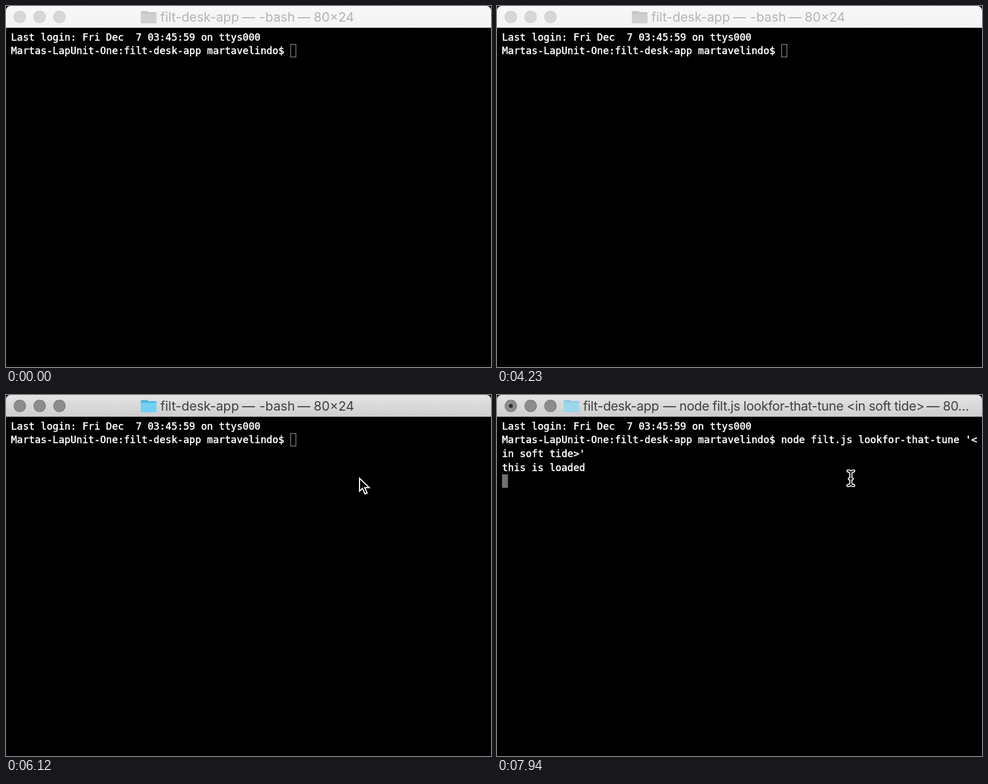
Write an HTML page with a canvas that moves like this. It is 867x646 px and loops after 8000 ms.

```html
<!DOCTYPE html>
<html lang="en">
<head>
<meta charset="utf-8">
<title>Terminal</title>
<style>
html, body { margin: 0; width: 100%; height: 100%; overflow: hidden; background: #000; }
canvas { display: block; }
</style>
</head>
<body>
<canvas id="stage" width="867" height="646"></canvas>
<script>
const ctx = document.getElementById('stage').getContext('2d');
const W = 867, H = 646, LOOP = 8000;
const BAR = 39;
const CELL = { x: 9, y: 43.3, w: 10.617, h: 24.6 };

// Moments in ms at which the state of the window changes.
const AT = { pointer: 5680, focus: 6090, block: 6140, beam: 6200, recall: 7460, run: 7730, loaded: 7900 };

const PROMPT = 'Martas-LapUnit-One:filt-desk-app martavelindo$ ';
const COMMAND = "node filt.js lookfor-that-tune '<in soft tide>'";

// Pointer tip: time, x, y.
const PATH = [[5680, 699, 650], [5780, 697, 408], [5810, 691, 338], [5870, 674, 254],
  [5950, 648, 184], [6030, 634, 152], [6080, 631, 147]];

function pointerAt(t) {
  const last = PATH[PATH.length - 1];
  if (t >= last[0]) return [last[1], last[2]];
  const i = PATH.findIndex(p => p[0] > t);
  const [t0, x0, y0] = PATH[i - 1], [t1, x1, y1] = PATH[i];
  const k = (t - t0) / (t1 - t0);
  return [x0 + (x1 - x0) * k, y0 + (y1 - y0) * k];
}

function disc(x, y, r, fill) {
  ctx.beginPath();
  ctx.arc(x, y, r, 0, Math.PI * 2);
  ctx.fillStyle = fill;
  ctx.fill();
}

function box(x, y, w, h, r, fill) {
  ctx.beginPath();
  ctx.roundRect(x, y, w, h, r);
  ctx.fillStyle = fill;
  ctx.fill();
}

function folder(x, back, front) {
  box(x, 9, 13, 8, 2, back);
  box(x, 11, 28, 20, 2, back);
  box(x, 14, 28, 17, [1, 1, 2, 2], front);
}

function titleBar(active, running) {
  const shade = ctx.createLinearGradient(0, 0, 0, BAR);
  shade.addColorStop(0, active ? '#e4e4e4' : '#f8f8f8');
  shade.addColorStop(1, active ? '#cecece' : '#f3f3f3');
  box(0, 0, W, BAR, [8, 8, 0, 0], shade);
  ctx.fillStyle = active ? '#b0b0b0' : '#dadada';
  ctx.fillRect(0, BAR - 1, W, 1);

  for (let i = 0; i < 3; i++) {
    const x = 24.7 + i * 35.4;
    disc(x, 19.5, 11, active ? '#777' : '#cbcbcb');
    disc(x, 19.5, 10, active ? '#8c8c8c' : '#d7d7d7');
  }
  if (running) disc(24.7, 19.5, 3.6, '#2c2c2c');

  if (running) folder(119, '#90cde6', '#a0d6ec');
  else if (active) folder(241, '#50b8e4', '#72d0f6');
  else folder(241, '#c6c6c6', '#d0d0d0');

  ctx.font = '23px Inter, Roboto, sans-serif';
  ctx.letterSpacing = running ? '-0.4px' : '0px';
  ctx.fillStyle = active ? '#404040' : '#b4b4b4';
  const parts = running
    ? [['filt-desk-app', 154], ['—', 297], [COMMAND.replaceAll("'", ''), 326], ['—', 768], ['80…', 797]]
    : [['filt-desk-app', 276], ['—', 422], ['-bash', 453], ['—', 521], ['80×24', 550]];
  for (const [text, x] of parts) ctx.fillText(text, x, 28);
  ctx.letterSpacing = '0px';
}

// Writes on the 80-column grid and returns the cell after the last character.
function write(text, row, col = 0) {
  ctx.font = '17.64px "DejaVu Sans Mono", monospace';
  ctx.fillStyle = ctx.strokeStyle = '#fff';
  ctx.lineWidth = 0.55;
  ctx.lineJoin = 'round';
  for (const ch of text) {
    if (col === 80) { col = 0; row++; }
    const x = CELL.x + col * CELL.w, y = CELL.y + row * CELL.h + 18.5;
    ctx.fillText(ch, x, y);
    ctx.strokeText(ch, x, y);
    col++;
  }
  return { row, col };
}

function caret({ row, col }, solid) {
  const x = Math.round(CELL.x + col * CELL.w), y = Math.round(CELL.y + row * CELL.h);
  if (solid) {
    ctx.fillStyle = '#707070';
    ctx.fillRect(x, y, 10.6, 24);
  } else {
    ctx.strokeStyle = '#777';
    ctx.lineWidth = 1.5;
    ctx.lineJoin = 'miter';
    ctx.strokeRect(x + 0.75, y + 0.75, 9.5, 22.5);
  }
}

function arrow(x, y) {
  const points = [[1, 2], [1, 25], [6.3, 20], [10.8, 30.2], [14.6, 28.5], [10.4, 18.8], [18.3, 18.8]];
  ctx.beginPath();
  for (const [dx, dy] of points) ctx.lineTo(x + dx, y + dy);
  ctx.closePath();
  ctx.fillStyle = '#000';
  ctx.fill();
  ctx.strokeStyle = '#fff';
  ctx.lineWidth = 2;
  ctx.lineJoin = 'miter';
  ctx.stroke();
}

function beam(x, y) {
  ctx.beginPath();
  for (const side of [-1, 1]) {
    ctx.moveTo(x + side * 5, y - 13);
    ctx.quadraticCurveTo(x, y - 13, x, y - 8.5);
    ctx.lineTo(x, y + 8.5);
    ctx.quadraticCurveTo(x, y + 13, x + side * 5, y + 13);
  }
  ctx.moveTo(x - 2.5, y + 1);
  ctx.lineTo(x + 2.5, y + 1);
  ctx.lineCap = 'round';
  ctx.lineJoin = 'round';
  for (const [color, width] of [['#fff', 5.6], ['#000', 2]]) {
    ctx.strokeStyle = color;
    ctx.lineWidth = width;
    ctx.stroke();
  }
}

function draw(t) {
  ctx.fillStyle = '#000';
  ctx.fillRect(0, 0, W, H);
  titleBar(t >= AT.focus, t >= AT.run);

  write('Last login: Fri Dec  7 03:45:59 on ttys000', 0);
  let end = write(PROMPT + (t >= AT.recall ? COMMAND : ''), 1);
  if (t >= AT.run) end = { row: 3, col: 0 };
  if (t >= AT.loaded) {
    write('this is loaded', 3);
    end = { row: 4, col: 0 };
  }
  caret(end, t >= AT.block);

  if (t >= AT.beam) beam(632.5, 149);
  else if (t >= AT.pointer) arrow(...pointerAt(t));
}

const start = performance.now();
function tick() {
  draw((performance.now() - start) % LOOP);
  requestAnimationFrame(tick);
}
tick();
</script>
</body>
</html>
```
